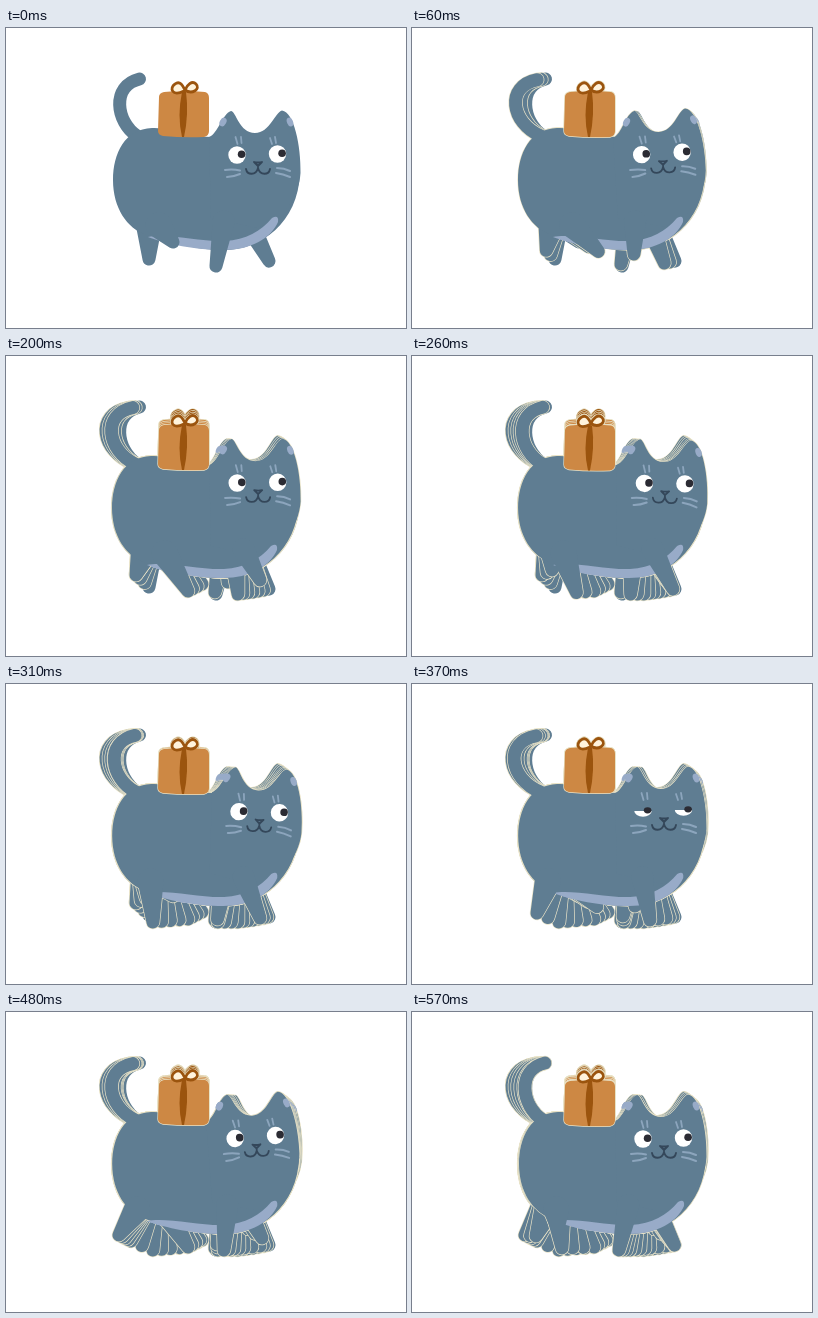
Write an HTML page with a canvas that moves like this. It is 400 by 300 pixels and loops after 600 ms.

```html
<!DOCTYPE html>
<html lang="en">
<head>
<meta charset="utf-8">
<title>Walking cat</title>
<style>
  html, body { margin: 0; width: 100%; height: 100%; overflow: hidden; background: #fff; }
  canvas { display: block; }
</style>
</head>
<body>
<canvas id="stage" width="400" height="300"></canvas>
<script>
const ctx = document.getElementById('stage').getContext('2d');
const STEP = 30, STEPS = 20;
const FUR = '#5f7d92', PALE = '#98abc8', DARK = '#34475a', EDGE = '#e9e3c8';
const BOX = '#cd8844', RIBBON = '#9b540e';

// Each track lists [step, ...values]
const tracks = {
  tilt: [[0, 0], [3, -3], [6, .3], [9, 3], [10, 3], [12, 0], [15, -3], [16, -2.8], [19, 0], [20, 0]],
  sway: [[0, 0], [3, -1.5], [6, -1], [10, -.8], [16, -.8], [19, 0], [20, 0]],
  tail: [[0, 0], [2, .75], [3, 1], [4, 1], [6, .6], [8, .25], [10, .4], [12, .85], [14, 1], [16, .6], [18, .15], [19, .05], [20, 0]],
  drop: [[0, 0], [3, 0], [6, 5], [8, 5.5], [10, 1], [12, 0], [14, 1], [16, 4], [19, 5], [20, 0]],
  eyes: [[0, 1], [10, 1], [12, .5], [13, .12], [14, .5], [15, 1], [20, 1]],
  nearFront: [[0, 210, 238], [1, 209, 236], [2, 222, 226], [3, 238, 209], [4, 248, 212], [6, 254, 224], [8, 261, 233], [10, 254, 234], [12, 238, 236], [16, 218, 238], [19, 207, 238], [20, 210, 238]],
  farFront: [[0, 263, 233], [3, 247, 236], [6, 232, 238], [9, 212, 238], [11, 211, 232], [13, 235, 212], [16, 256, 226], [18, 262, 233], [20, 263, 233]],
  nearRear: [[0, 167, 214], [3, 196, 228], [6, 182, 235], [10, 147, 238], [12, 125, 229], [16, 113, 223], [18, 124, 224], [19, 146, 217], [20, 167, 214]],
  farRear: [[0, 143, 231], [3, 130, 218], [6, 130, 219], [8, 140, 214], [10, 167, 212], [13, 194, 228], [16, 182, 235], [19, 150, 236], [20, 143, 231]]
};

function at(name, k) {
  const keys = tracks[name];
  const i = keys.findIndex((key, n) => n && k <= key[0]);
  const a = keys[i - 1], b = keys[i];
  const u = (k - a[0]) / (b[0] - a[0]);
  return a.slice(1).map((v, n) => v + (b[n + 1] - v) * u);
}

const body = new Path2D('M210 109C186 110 166 99 146 100C119 101 107 125 107 152C107 180 121 200 140 207C160 214 190 222 218 222C255 222 292 195 294 145L250 110Z');
const head = new Path2D('M203 109C212 106 216 86 225 83C230 83 233 105 249 105C264 105 269 84 276 82.5C288 84 295 118 294.5 145C293 170 275 195 250 200L205 190Z');
const belly = new Path2D('M142 209C160 205 195 214 219 213C240 212 255 203 266 190Q273 186 272 194C265 210 245 222 218 222C190 222 160 216 142 209Z');
const box = new Path2D('M158 64Q178 62 199 64Q203 65 203 70L203 103Q203 108 198 109Q178 110 157 108Q152 107 152 103L153 69Q153 65 158 64Z');
const bow = new Path2D('M178 63C166 69 163 60 169 56C174 52 177 58 179 62M179 62C181 57 186 52 190 56C195 61 186 67 179 62');
const ribbon = new Path2D('M176 64Q171 88 176 109L178 109Q183 86 180 64Z');
const mouth = new Path2D('M240 141C241 147 250 148 252 140C254 148 263 147 264 141M252 140L252 137M248 134Q252 135 256 134L252 138Z');
const lashes = new Path2D('M229.5 109L231.5 116M235 109L235.5 115M264 110L266 116M269 109L270 115');
const whiskers = new Path2D('M219 142Q227 141 234 142.5M221 149Q227 149 234 146M271 140Q278 140 284 143M270 145Q277 146 284 149');

// Tapered capsule from hip to foot
function limb([fx, fy], rest, hipY, pull, r) {
  const hx = rest + (fx - rest) * pull, R = 6.5;
  const dx = fx - hx, dy = fy - hipY;
  const a = Math.atan2(dy, dx), s = Math.acos((r - R) / Math.max(Math.hypot(dx, dy), r));
  const p = new Path2D();
  p.arc(hx, hipY, r, a + s, a - s);
  p.arc(fx, fy, R, a - s, a + s);
  p.closePath();
  return p;
}

function tailPath(k) {
  const [v] = at('tail', k);
  return new Path2D(`M${131 - 3 * v} 108C${110 - 15 * v} ${94 + v} ${105 - 16 * v} 58 ${133.5 - 11 * v} ${51 + v}`);
}

function line(path, color, width) {
  ctx.strokeStyle = color;
  ctx.lineWidth = width;
  ctx.stroke(path);
}

function fill(path, color) {
  ctx.fillStyle = color;
  ctx.fill(path);
}

function oval(x, y, rx, ry, turn, color) {
  const p = new Path2D();
  p.ellipse(x, y, rx, ry, turn, 0, Math.PI * 2);
  fill(p, color);
}

function shifted(x, y, draw) {
  ctx.save();
  ctx.translate(x, y);
  draw();
  ctx.restore();
}

function tilted(deg, draw) {
  ctx.save();
  ctx.translate(220, 165);
  ctx.rotate(deg * Math.PI / 180);
  ctx.translate(-220, -165);
  draw();
  ctx.restore();
}

function eye(x, y, open) {
  ctx.save();
  ctx.beginPath();
  ctx.rect(x - 10, y + 9 - 18 * open, 20, 20);
  if (open < 1) {
    ctx.clip();
    ctx.translate(0, y * .35);
    ctx.scale(1, .65);
  }
  oval(x, y, 8.7, 8.7, 0, '#fff');
  ctx.restore();
  oval(x + 4.6, y - .7, 3.8, 3.8 * Math.max(open, .2) ** .3, 0, '#2b2b33');
}

function face(open) {
  oval(217, 94, 3.2, 4.6, .5, PALE);
  oval(284, 94, 3, 4.6, -.4, PALE);
  line(lashes, '#8ca5bd', 1.8);
  line(whiskers, '#8ca5bd', 2);
  eye(231, 127, open);
  eye(271.5, 126, open);
  line(mouth, DARK, 1.8);
}

function parcel(outlined) {
  if (outlined) {
    line(box, EDGE, 1.3);
    line(bow, EDGE, 4);
  }
  fill(box, BOX);
  fill(ribbon, RIBBON);
  fill(bow, '#fff3dc');
  line(bow, RIBBON, 2.8);
}

function pose(k) {
  const [tilt] = at('tilt', k), [sway] = at('sway', k);
  const [drop] = at('drop', k), [open] = at('eyes', k);
  const tail = tailPath(k);
  const front = name => limb(at(name, k), 224, 193, .45, 11);
  const rear = name => limb(at(name, k), 143, 197, .4, 13);
  const far = [front('farFront'), rear('farRear')];
  const near = [front('nearFront'), rear('nearRear')];
  const legs = [...far, ...near];

  if (k) {
    line(tail, EDGE, 14.4);
    legs.forEach(p => line(p, EDGE, 1.4));
    shifted(sway, 0, () => line(body, EDGE, 1.3));
    tilted(tilt, () => line(head, EDGE, 1.3));
  }
  line(tail, FUR, 13);
  far.forEach(p => fill(p, FUR));
  shifted(sway, 0, () => fill(body, FUR));
  tilted(tilt, () => fill(head, FUR));
  shifted(sway, 0, () => fill(belly, PALE));
  near.forEach(p => fill(p, FUR));
  tilted(tilt, () => face(open));
  shifted(0, drop, () => parcel(k > 0));
}

// Earlier poses stay visible beneath the current one until the loop restarts
function draw(step) {
  ctx.fillStyle = '#fff';
  ctx.fillRect(0, 0, 400, 300);
  ctx.lineCap = ctx.lineJoin = 'round';
  for (let k = 0; k <= step; k++) pose(k);
}

const start = performance.now();
let shown = -1;
function tick() {
  const step = Math.floor((performance.now() - start) / STEP) % STEPS;
  if (step !== shown) draw(shown = step);
  requestAnimationFrame(tick);
}
tick();
</script>
</body>
</html>
```
